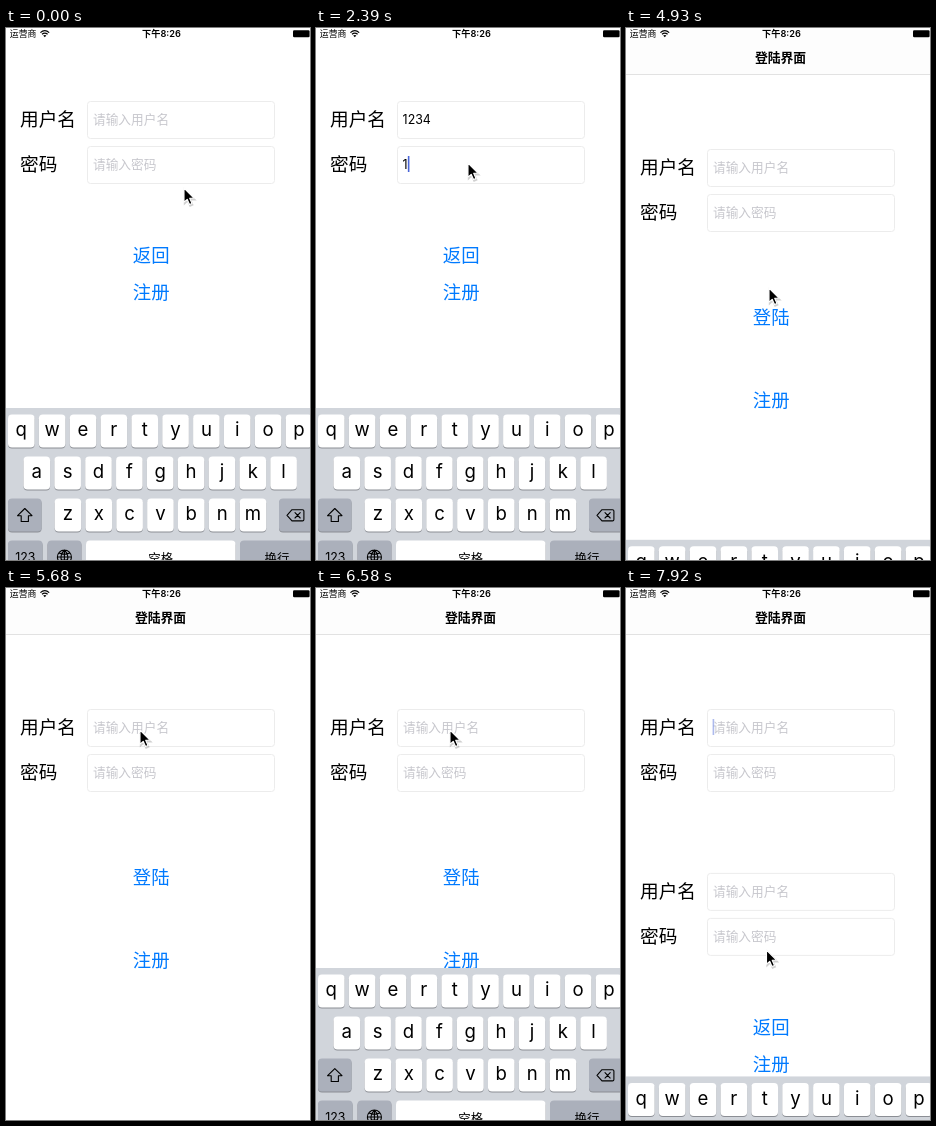
Animation, 304 px wide and 532 px high, one loop 8 s. Source, as an HTML page:

```html
<!DOCTYPE html>
<html lang="zh-CN">
<head>
<meta charset="utf-8">
<style>
  html, body { margin: 0; width: 100%; height: 100%; overflow: hidden; background: #fff; }
  svg { display: block; width: 304px; height: 532px; cursor: default; user-select: none; }
  text { font-family: Inter, "Noto Sans CJK SC", "Noto Sans CJK", sans-serif; white-space: pre; }
  .label { font-size: 18.7px; fill: #000; }
  .button { font-size: 18.4px; fill: #007aff; }
  .hint { font-size: 12.7px; fill: #c7c7cd; }
  .value { font-size: 12.4px; fill: #000; }
  .letter { font-size: 18.6px; text-anchor: middle; }
  .small { font-size: 12.4px; text-anchor: middle; }
  .icon { fill: none; stroke: #000; stroke-width: 1.1; stroke-linejoin: round; stroke-linecap: round; }
</style>
</head>
<body>
<svg id="stage" viewBox="0 0 304 532" xmlns="http://www.w3.org/2000/svg"></svg>
<script>
const LOOP = 8000, TICK = 149.25;
const SCREEN = 552, KEYBOARD_TOP = 380, KEYBOARD_TRAVEL = 176;
const stage = document.getElementById('stage');

function add(parent, tag, attrs = {}, content) {
  const node = document.createElementNS('http://www.w3.org/2000/svg', tag);
  for (const name in attrs) node.setAttribute(name, attrs[name]);
  if (content) node.textContent = content;
  parent.appendChild(node);
  return node;
}
const write = (parent, content, x, y, cls) => add(parent, 'text', { x, y, class: cls }, content);
const moveTo = (node, x, y) => node.setAttribute('transform', `translate(${x} ${y})`);
const show = (node, alpha) => node.setAttribute('opacity', +alpha);

function addField(parent, name, y) {
  write(parent, name, 14, y + 24.8, 'label');
  add(parent, 'rect', { x: 81.5, y: y + .5, width: 187, height: 37, rx: 3, fill: '#fff', stroke: '#ececec' });
  const hint = write(parent, '请输入' + name, 87, y + 22.8, 'hint');
  const value = write(parent, '', 86.6, y + 22.6, 'value');
  const caret = add(parent, 'rect', { x: 86.6, y: y + 10, width: 1.6, height: 16, fill: '#4a66d8', opacity: 0 });
  return {
    set(count, caretAlpha) {
      value.textContent = '1234'.slice(0, count);
      show(hint, !count);
      caret.setAttribute('x', count ? 86.8 + value.getComputedTextLength() : 86.6);
      show(caret, caretAlpha);
    }
  };
}

function addPage(y, actions) {
  const page = add(stage, 'g');
  add(page, 'rect', { width: 304, height: 600, fill: '#fff' });
  const user = addField(page, '用户名', y);
  const pass = addField(page, '密码', y + 45);
  const buttons = actions.map(([name, top]) => write(page, name, 126.8, top, 'button'));
  return { page, user, pass, register: buttons[1] };
}

const login = addPage(121, [['登陆', 296.2], ['注册', 378.7]]);
add(login.page, 'rect', { width: 304, height: 46, fill: '#fdfdfd' });
add(login.page, 'rect', { y: 46, width: 304, height: 1, fill: '#e2e2e2' });
add(login.page, 'text', { x: 154.5, y: 34.3, 'font-size': 12.8, 'font-weight': 700, 'text-anchor': 'middle' }, '登陆界面');

const signup = addPage(73, [['返回', 233.7], ['注册', 271.2]]);

const keyboard = add(stage, 'g');
const keyboardBase = add(keyboard, 'rect', { width: 304, height: 190, fill: '#d1d5db' });

function addKey(x, y, width, fill = '#fff') {
  for (const [dy, color] of [[1.1, '#8b8e94'], [0, fill]])
    add(keyboard, 'rect', { x, y: y + dy, width, height: 33, rx: 4, fill: color });
}
[['qwertyuiop', 2], ['asdfghjkl', 17.5], ['zxcvbnm', 48.6]].forEach(([letters, left], row) => {
  [...letters].forEach((letter, i) => {
    const x = left + i * 30.85, y = 6.5 + row * 42;
    addKey(x, y, 26.6);
    write(keyboard, letter, x + 13.3, y + 21.8, 'letter');
  });
});
const GRAY = '#abb0bb';
addKey(2, 90.5, 33.6, GRAY);
addKey(273, 90.5, 35, GRAY);
addKey(2, 132.5, 34.6, GRAY);
addKey(41.5, 132.5, 34, GRAY);
addKey(80, 132.5, 149.5);
addKey(234, 132.5, 74, GRAY);
write(keyboard, '123', 19.3, 153.8, 'small');
write(keyboard, '空格', 154.7, 154.8, 'small');
write(keyboard, '换行', 271, 154.8, 'small');
add(keyboard, 'path', { class: 'icon', d: 'M18.8 100.5l7.2 7.2h-3.6v5.8h-7.2v-5.8h-3.6z' });
add(keyboard, 'path', { class: 'icon', d: 'M281 107.3l5-5.6h10.5q1.4 0 1.4 1.4v8.4q0 1.4-1.4 1.4H286zM289 104.6l5.2 5.4M294.2 104.6l-5.2 5.4' });
add(keyboard, 'path', {
  class: 'icon', 'stroke-width': .9,
  d: 'M51.4 149a7 7 0 1 0 14 0a7 7 0 1 0-14 0zh14M58.4 142v14M58.4 142q-7 7 0 14M58.4 142q7 7 0 14M53 145q5.4 2.4 10.8 0M53 153q5.4-2.4 10.8 0'
});

const status = add(stage, 'g');
add(status, 'text', { x: 3.8, y: 9.2, 'font-size': 8.9 }, '运营商');
add(status, 'text', { x: 155.5, y: 9.3, 'font-size': 9.2, 'font-weight': 600, 'text-anchor': 'middle' }, '下午8:26');
add(status, 'path', { d: 'M34.4 4.6q4.4-3.8 8.8 0M36 6.3q2.8-2.4 5.6 0', fill: 'none', stroke: '#000', 'stroke-width': 1.2 });
add(status, 'path', { d: 'M37.2 7.5q1.6-1.2 3.2 0l-1.6 1.7z' });
add(status, 'rect', { x: 287, y: 2.2, width: 16.6, height: 7, rx: 1.2 });
const spinner = add(status, 'g');
for (let i = 0; i < 8; i++)
  add(spinner, 'path', { d: 'M0-1.7V-3.4', stroke: '#000', 'stroke-width': .9, opacity: .25 + i * .08, transform: `rotate(${i * 45})` });

const pointer = add(stage, 'g');
const ARROW = 'M0 0V14.2l3.2-2.9 2.3 5.2 2.5-1.1-2.3-5.1h4.5z';
add(pointer, 'path', { d: ARROW, fill: '#000', opacity: .18, transform: 'translate(.6 1.4)', stroke: '#000', 'stroke-width': 1.6 });
add(pointer, 'path', { d: ARROW, fill: '#000', stroke: '#fff', 'stroke-width': 1.1, 'stroke-linejoin': 'round' });

// Pointer stops: tick, x, y
const STOPS = [
  [0, 178, 160], [9, 178, 160], [13, 152, 135], [22, 152, 135], [26, 143, 260], [33, 143, 260],
  [36, 130, 149], [38, 134, 142], [44, 134, 142], [49, 140.5, 362], [54, 140.5, 362]
];
// Caret and press levels: start tick, alpha
const USER_CARET = [[0, 0], [2, 1], [12, 0]];
const PASS_CARET = [[0, 0], [14, 1], [25, 0]];
const LOGIN_CARET = [[0, 0], [40, 1], [43, .4], [44, 0], [46, 1], [50, 0], [53, .45]];
const SIGNUP_PRESS = [[0, 1], [27, .2], [28, .45], [29, .8], [30, 1]];
const LOGIN_PRESS = [[0, 1], [50, .2], [52, .5]];
const USER_TYPED = [4, 5, 7, 9], PASS_TYPED = [16, 18, 20, 22];

const levelAt = (table, tick) => table.filter(row => row[0] <= tick).pop()[1];
const typedAt = (times, tick) => times.filter(start => start <= tick).length;

function pointerAt(tick) {
  const i = Math.max(1, STOPS.findIndex(stop => stop[0] >= tick));
  const [t0, x0, y0] = STOPS[i - 1], [t1, x1, y1] = STOPS[i];
  const p = (tick - t0) / (t1 - t0), e = p * p * (3 - 2 * p);
  return [x0 + (x1 - x0) * e, y0 + (y1 - y0) * e];
}

// Critically damped slide from 0 to 1
function slide(time, start) {
  const x = Math.max(0, time - start) * .018;
  return 1 - (1 + x) * Math.exp(-x);
}

function draw(tick) {
  const time = tick * TICK;
  const fresh = tick >= 45;

  signup.user.set(fresh ? 0 : typedAt(USER_TYPED, tick), levelAt(USER_CARET, tick));
  signup.pass.set(fresh ? 0 : typedAt(PASS_TYPED, tick), levelAt(PASS_CARET, tick));
  login.user.set(0, levelAt(LOGIN_CARET, tick));
  show(signup.register, levelAt(SIGNUP_PRESS, tick));
  show(login.register, levelAt(LOGIN_PRESS, tick));

  moveTo(signup.page, 0, SCREEN * (slide(time, 4730) - slide(time, 7794.5)));
  const hidden = slide(time, 4776) - slide(time, 5933) + slide(time, 7794.5);
  moveTo(keyboard, 0, KEYBOARD_TOP + KEYBOARD_TRAVEL * hidden);

  show(spinner, tick >= 28 && tick <= 30);
  spinner.setAttribute('transform', `translate(52.3 5.6) rotate(${tick * 45})`);
  moveTo(pointer, ...pointerAt(tick));
}

const began = performance.now();
let last = -1;
function run() {
  const tick = Math.floor((performance.now() - began) % LOOP / TICK);
  if (tick !== last) draw(last = tick);
  requestAnimationFrame(run);
}
run();
</script>
</body>
</html>
```
